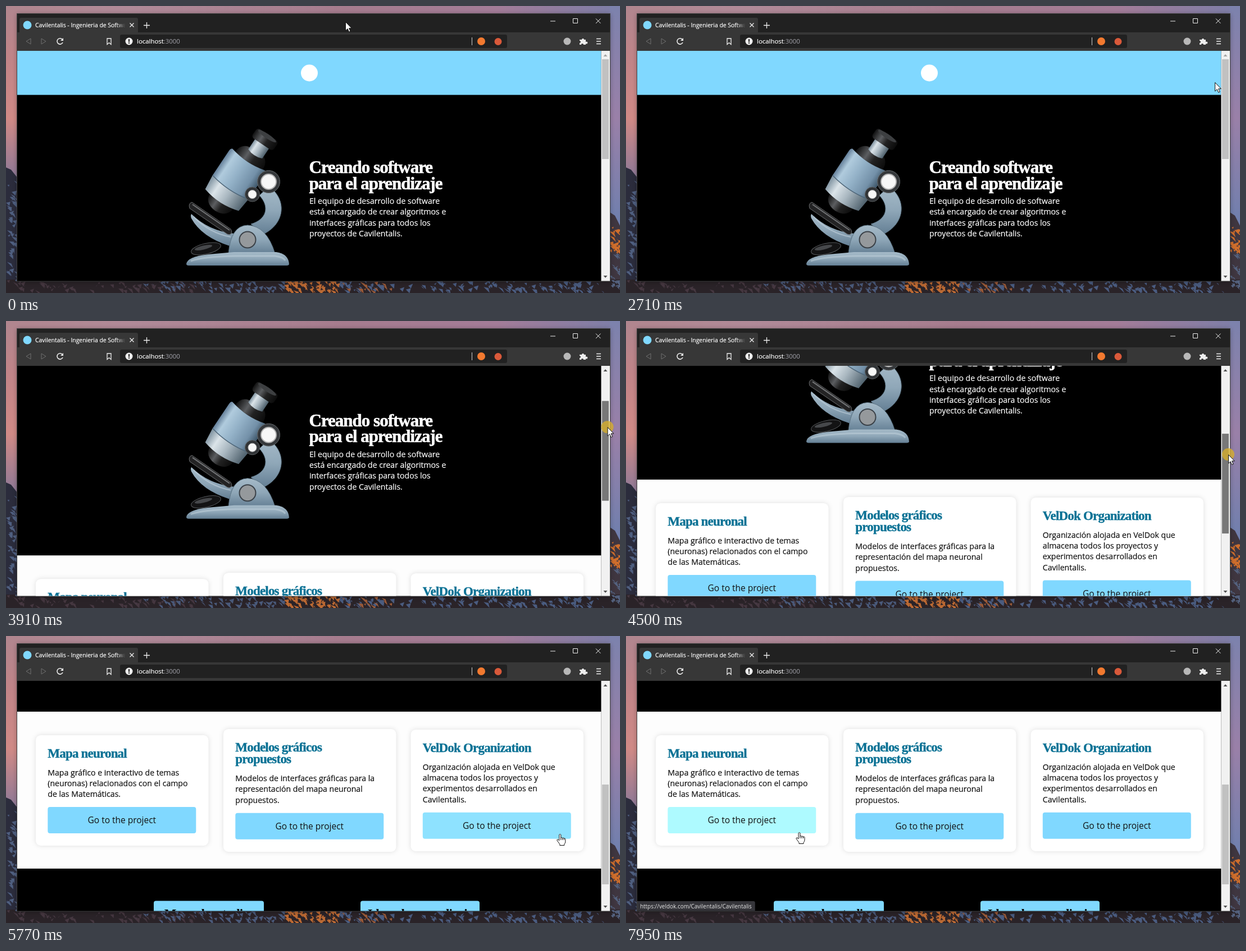
Animation of 1093x512 px, one loop 7990 ms. Source, as an HTML page:

```html
<!DOCTYPE html>
<html lang="es">
<head>
<meta charset="utf-8">
<title>Cavilentalis</title>
<style>
html, body { margin: 0; width: 100%; height: 100%; overflow: hidden; background: #212121; }
svg { display: block; width: 1093px; height: 512px; }
text { font-family: "Open Sans", "Noto Sans", sans-serif; }
.body { font-size: 14.09px; stroke-width: .2; }
.go { font-size: 15.5px; text-anchor: middle; fill: #111; }
.hero, .title { font-family: "Liberation Serif", "Noto Serif", serif; font-weight: bold; }
.hero { font-size: 31px; letter-spacing: -1px; stroke-width: .6; }
.title { font-size: 23px; letter-spacing: -.8px; stroke-width: .4; }
.ui { fill: #fff; stroke: #fff; stroke-width: .2; }
.card { filter: drop-shadow(0 0 4px rgba(0,0,0,.12)); }
.line { fill: none; stroke: #eee; stroke-width: 1.3; }
</style>
</head>
<body>
<svg viewBox="0 0 1093 512">
  <defs>
    <linearGradient id="sky" x2="1" y2="0">
      <stop stop-color="#b0868f"/><stop offset=".2" stop-color="#b08a98"/>
      <stop offset=".55" stop-color="#a67c8e"/><stop offset=".8" stop-color="#a37c98"/>
      <stop offset="1" stop-color="#7c7ea8"/>
    </linearGradient>
    <linearGradient id="west" x2="0" y2="1">
      <stop stop-color="#b0868f"/><stop offset=".3" stop-color="#c08488"/>
      <stop offset=".65" stop-color="#d08a86"/><stop offset="1" stop-color="#8b7897"/>
    </linearGradient>
    <linearGradient id="east" x2="0" y2="1">
      <stop stop-color="#7c82ad"/><stop offset=".5" stop-color="#9a80a8"/>
      <stop offset="1" stop-color="#6c7fae"/>
    </linearGradient>
    <linearGradient id="barrel" x2="1" y2="0">
      <stop stop-color="#65809a"/><stop offset=".16" stop-color="#b0cbdd"/>
      <stop offset=".45" stop-color="#94b2c8"/><stop offset=".8" stop-color="#7390a8"/>
      <stop offset="1" stop-color="#3d5568"/>
    </linearGradient>
    <linearGradient id="silver" x2="1" y2="0">
      <stop stop-color="#7b8f9d"/><stop offset=".25" stop-color="#dbe4e9"/>
      <stop offset=".55" stop-color="#a9b7c0"/><stop offset="1" stop-color="#4d5f6b"/>
    </linearGradient>
    <linearGradient id="steel" x2="0" y2="1">
      <stop stop-color="#a5bac8"/><stop offset=".5" stop-color="#8fa7b8"/>
      <stop offset="1" stop-color="#647f94"/>
    </linearGradient>
    <linearGradient id="dark" x2="1" y2="0">
      <stop stop-color="#111"/><stop offset=".35" stop-color="#5b5d60"/>
      <stop offset=".6" stop-color="#222"/><stop offset="1" stop-color="#0b0b0b"/>
    </linearGradient>
    <linearGradient id="fade" x2="1" y2="0">
      <stop stop-color="#373737" stop-opacity="0"/><stop offset="1" stop-color="#373737"/>
    </linearGradient>
    <filter id="blur"><feGaussianBlur stdDeviation="4"/></filter>
    <clipPath id="view"><rect x="20" y="80" width="1039.500" height="410.500"/></clipPath>
  </defs>

  <!-- wallpaper -->
  <rect width="1093" height="512" fill="url(#sky)"/>
  <rect width="20" height="310" fill="url(#west)"/>
  <rect x="1075" width="18" height="400" fill="url(#east)"/>
  <path d="M0 288l9 4 11 14v206H0z" fill="#2b2c3c"/>
  <path d="M1075 368l9 6 9 18v120h-18z" fill="#3f3640"/>
  <path d="M0 488h1093v24H0z" fill="#2a2328"/>
  <g id="rocks"></g>

  <!-- browser window -->
  <rect x="20" y="15" width="1055" height="477" fill="#000" opacity=".35" filter="url(#blur)"/>
  <rect x="19.500" y="13.500" width="1056" height="477.500" fill="#212121" stroke="#424242"/>
  <rect x="20" y="47" width="1055" height="33" fill="#373737"/>
  <path d="M24 47V24q0-3 3-3h205q3 0 3 3v23z" fill="#373737"/>
  <circle cx="38" cy="34" r="7.500" fill="#80d8ff"/>
  <text class="ui" x="52" y="38" font-size="10.400">Cavilentalis - Ingenieria de Softwa</text>
  <rect x="195" y="24" width="18" height="20" fill="url(#fade)"/>
  <rect x="212" y="24" width="7" height="20" fill="#373737"/>
  <path class="line" d="M220.500 30.500l7 7m0-7l-7 7M245 34.500h11m-5.500-5.500v11" stroke-width="1.600"/>
  <path class="line" d="M969 27h9M1009.500 22.500h8v8h-8zM1050 22.500l8.500 8.500m0-8.500l-8.500 8.500" style="stroke-width:1"/>
  <path class="line" d="M44 58v10l-8-5zM63 58v10l8-5z" style="stroke:#707070;stroke-width:1"/>
  <path class="line" d="M100.500 60a5.200 5.200 0 1 0 .5 5" style="stroke-width:1.600"/>
  <path d="M102 57v5h-5z" fill="#eee"/>
  <path class="line" d="M180 58h7v10.500l-3.500-3-3.500 3z"/>
  <rect x="203" y="51" width="689" height="24" rx="3" fill="#212121"/>
  <circle cx="219" cy="63" r="6.500" fill="#eee"/>
  <path d="M218 59h2v5h-2zm0 6h2v2h-2z" fill="#212121"/>
  <text class="ui" x="233" y="67" font-size="11.400">localhost<tspan fill="#a5a5ad" stroke="none">:3000</tspan></text>
  <path d="M829.500 56v14" stroke="#ccc"/>
  <circle cx="846" cy="63" r="7" fill="#f2792f"/>
  <circle cx="876" cy="63.500" r="6.500" fill="#d9593a"/>
  <circle cx="999" cy="63" r="6.500" fill="#b8b8b8"/>
  <path d="M1021 60h4a2 2 0 1 1 4 0h3v4a2 2 0 1 1 0 3v2h-4a2 2 0 0 0-4 0h-3v-3a2 2 0 0 0 0-4z" fill="#eee"/>
  <path class="line" d="M1051 58.500h8m-8 4.500h8m-8 4.500h8"/>

  <g clip-path="url(#view)">
    <g id="page">
      <rect x="20" y="80" width="1040" height="1000"/>
      <rect x="20" y="80" width="1040" height="78.600" fill="#80d8ff"/>
      <circle cx="540" cy="119.500" r="15" fill="#fff"/>

      <!-- microscope -->
      <path d="M468 322c32 22 30 66-10 85l-22-18c28-8 34-31 15-51z" fill="url(#steel)" stroke="#5d7484"/>
      <path d="M330 371q30 30 76 35l-8 22q-50-16-68-49-2-5 0-8z" fill="url(#steel)"/>
      <path d="M334 376q28 29 66 36" fill="none" stroke="#c3d3de" stroke-width="2" opacity=".6"/>
      <path d="M331 350l69 48q3 4 1 8-3 3-7 1l-67-46q-3-9 4-11z" fill="#232324" stroke="#6b6d6f"/>
      <path d="M332 354l66 46" stroke="#737577" stroke-width="2"/>
      <g transform="rotate(-13 356 433)">
        <ellipse cx="356" cy="433" rx="27" ry="9.500" fill="#131314" stroke="#55585b"/>
        <ellipse cx="352" cy="430" rx="16" ry="3.500" fill="#46484b"/>
      </g>
      <path d="M396 442q4-50 34-51 34 1 49 51z" fill="url(#steel)" stroke="#5d7484"/>
      <path d="M321 460q2-13 40-17l45-4h75q22 3 23 22-1 2-4 2H325q-4 0-4-3z" fill="url(#steel)"/>
      <path d="M329 455q20-8 80-9h70q15 2 18 8" fill="none" stroke="#c3d3de" stroke-width="3" opacity=".5"/>
      <circle cx="430" cy="417" r="14.500" fill="#95999c" stroke="#3a4148" stroke-width="2"/>
      <g transform="translate(461 238) rotate(33.800)">
        <path d="M-28 133h50q-1 21-25 22-24-1-25-22z" fill="url(#dark)"/>
        <path d="M-32 50q0-19 15-23h32q12 4 12 24z" fill="url(#dark)"/>
        <path d="M-15 7h30v24q-15 6-30 0z" fill="url(#silver)"/>
        <rect x="-23" y="-10" width="46" height="20" rx="6" fill="url(#dark)"/>
        <ellipse cx="0" cy="-7" rx="19" ry="4" fill="#3d3f41"/>
        <path d="M-39 46q36 9 69 0 5 1 5 7v52q-38 9-77 0V52q0-5 3-6z" fill="url(#barrel)"/>
        <path d="M-42 105q39 9 77 0l-3 27q-35 11-71 1z" fill="url(#silver)"/>
        <path d="M-42 105q39 9 77 0" fill="none" stroke="#4d6578" stroke-width="1.500"/>
      </g>
      <circle cx="467.500" cy="313.500" r="20" fill="#35383b" stroke="#686d70"/>
      <circle cx="467.500" cy="313.500" r="13.500" fill="#f7f7f7" stroke="#b4b4b4" stroke-width="2"/>
      <circle cx="438.500" cy="336" r="13" fill="#303336" stroke="#5c6063"/>
      <circle cx="438.500" cy="336" r="7.500" fill="#f7f7f7" stroke="#b4b4b4"/>

      <g id="hero"></g>
      <g id="cards" transform="translate(0 393.500)">
        <rect x="20" y="135" width="1040" height="280" fill="#fdfdfd"/>
      </g>
    </g>
    <g id="status">
      <path id="bubble" fill="#35353a"/>
      <text id="url" x="25" y="486" font-size="9.950" fill="#e6e6e6"></text>
    </g>
  </g>

  <rect x="1059.500" y="80" width="15.500" height="410.500" fill="#f1f1f1"/>
  <path id="up" d="M1063.500 90l3.500-4 3.500 4z"/>
  <path d="M1063.500 481l3.500 4 3.500-4z" fill="#505050"/>
  <rect id="thumb" x="1061" width="12" height="178"/>

  <g id="cursor">
    <circle id="press" r="11" fill="#d9b02c" opacity=".78"/>
    <path id="arrow" d="M.500.500v15.500l3.600-3.400 2.500 5.700 2.500-1.100-2.500-5.500h4.700z" fill="#fff" stroke="#111"/>
    <g id="hand" fill="#fff" stroke="#111" stroke-linejoin="round">
      <path d="M-2 1.500q1.600-2 3 0V7q1.500-1.200 2.800.5 1.500-1 2.700.5 2-.7 2.500 1.500v4.500q-.3 3-2 4.500v2h-8v-2l-5-7q0-2.200 2-1.500l2 2z"/>
      <path d="M1 7v4m2.800-3.500V11m2.700-3v3" fill="none"/>
    </g>
  </g>
</svg>
<script>
const LOOP = 7990, TRACK_TOP = 95, SCROLL_RATIO = 2.315, CARD_OFFSET = 393.5, FADE = 300;
const $ = id => document.getElementById(id);

function add(parent, tag, attrs, text = '') {
  const el = document.createElementNS('http://www.w3.org/2000/svg', tag);
  for (const key in attrs) el.setAttribute(key, attrs[key]);
  el.textContent = text;
  return parent.appendChild(el);
}
const addLines = (parent, cls, x, y, step, lines, fill) =>
  lines.forEach((line, i) => add(parent, 'text', { class: cls, x, y: y + i * step, fill, stroke: fill }, line));

// Scatters small rock facets over a box
let seed = 7;
const random = () => (seed = seed * 16807 % 2147483647) / 2147483647;
function scatter(x, y, width, height, count, color) {
  let d = '';
  for (let i = 0; i < count; i++) {
    const size = 3 + random() * 6, slant = (random() - .5) * 8;
    d += `M${x + random() * width} ${y + random() * height}l${size} ${slant} ${slant} ${size}z`;
  }
  add($('rocks'), 'path', { d, fill: color });
}
scatter(0, 305, 16, 185, 45, '#4f5f80');
scatter(0, 490, 340, 18, 60, '#453740');
scatter(230, 490, 260, 18, 75, '#4a5a7b');
scatter(590, 490, 470, 18, 150, '#4a5c80');
scatter(495, 488, 95, 20, 70, '#bd6a33');
scatter(590, 490, 100, 18, 15, '#9a5a38');
scatter(1073, 395, 18, 45, 35, '#cf6e2c');
scatter(1073, 440, 18, 65, 25, '#54627f');

addLines($('hero'), 'hero', 539.5, 298, 28.5, ['Creando software', 'para el aprendizaje'], '#fff');
addLines($('hero'), 'body', 540, 353, 19.35, [
  'El equipo de desarrollo de software', 'está encargado de crear algoritmos e',
  'interfaces gráficas para todos los', 'proyectos de Cavilentalis.'], '#fff');

const SITE = 'https://veldok.com/Cavilentalis';
const cards = [
  { x: 53, y: 177, h: 197, button: 305, title: ['Mapa neuronal'], url: SITE + '/Cavilentalis',
    text: ['Mapa gráfico e interactivo de temas', '(neuronas) relacionados con el campo', 'de las Matemáticas.'] },
  { x: 387, y: 166, h: 219, button: 315.7, title: ['Modelos gráficos', 'propuestos'], url: SITE + '/modelos',
    text: ['Modelos de interfaces gráficas para la', 'representación del mapa neuronal', 'propuestos.'] },
  { x: 720.5, y: 167, h: 217, button: 314.7, title: ['VelDok Organization'], url: SITE,
    text: ['Organización alojada en VelDok que', 'almacena todos los proyectos y', 'experimentos desarrollados en', 'Cavilentalis.'] },
];
for (const c of cards) {
  const g = $('cards'), x = c.x + 21.3, titleY = c.y + 40;
  add(g, 'rect', { class: 'card', x: c.x, y: c.y, width: 307.5, height: c.h, rx: 9, fill: '#fff' });
  addLines(g, 'title', x, titleY, 21.3, c.title, '#0b7295');
  addLines(g, 'body', x, titleY + 31.7 + 21.3 * (c.title.length - 1), 19.35, c.text, '#111');
  c.rect = add(g, 'rect', { x, y: c.button, width: 264, height: 47, rx: 4 });
  add(g, 'text', { class: 'go', x: x + 132, y: c.button + 29.3 }, 'Go to the project');
}
for (const [x, width, label] of [[263, 196, 'Mapa de estudios'], [631, 212, 'Ideas de aprendizaje']]) {
  add($('cards'), 'rect', { x, y: 472.5, width, height: 60, rx: 4, fill: '#80d8ff' });
  add($('cards'), 'text', { class: 'title', x: x + width / 2, y: 503, 'text-anchor': 'middle' }, label);
}

// Keys: time, x, y of the pointer
const pointerKeys = [
  [0, 604, 28], [1150, 604, 28], [1550, 850, 154], [1870, 962, 144], [2200, 962, 144],
  [2710, 1048, 136], [2960, 1061, 132], [3000, 1061, 132], [3110, 1068, 132], [3560, 1068, 132],
  [3910, 1070.5, 189], [4260, 1072, 236], [4470, 1072, 236], [4500, 1072, 238], [4930, 1076, 287],
  [5180, 1076, 302], [5550, 1076, 302], [5690, 1005, 345], [5770, 987, 353], [6050, 946, 350],
  [6210, 946, 350], [6970, 636, 342], [6990, 636, 342], [7080, 487, 334], [7260, 487, 334],
  [7580, 325, 346], [7950, 309, 350], [LOOP, 309, 350]];
// Keys: time, travel of the scrollbar thumb
const thumbKeys = [[0, 0], [3560, 0], [3910, 47.5], [4260, 104], [4470, 104], [4500, 106],
  [4930, 154.5], [5180, 170], [LOOP, 170]];

// Monotone cubic interpolation: rests stay still, no overshoot
function track(keys, t, col = 1) {
  let i = 0;
  while (i < keys.length - 2 && t >= keys[i + 1][0]) i++;
  const slope = k => keys[k] && keys[k + 1]
    ? (keys[k + 1][col] - keys[k][col]) / (keys[k + 1][0] - keys[k][0]) : 0;
  const tangent = k => {
    const a = slope(k - 1), b = slope(k);
    return a * b > 0 ? 2 * a * b / (a + b) : 0;
  };
  const [a, b] = [keys[i], keys[i + 1]], span = b[0] - a[0], u = (t - a[0]) / span, v = 1 - u;
  return a[col] * v * v * (1 + 2 * u) + b[col] * u * u * (3 - 2 * u)
    + span * u * v * (tangent(i) * v - tangent(i + 1) * u);
}

const scrollAt = t => track(thumbKeys, t) * SCROLL_RATIO;

function cardAt(t) {
  if (t < 5550) return null;
  const x = track(pointerKeys, t, 1), y = track(pointerKeys, t, 2) + scrollAt(t) - CARD_OFFSET;
  return cards.find(c => x > c.x + 21 && x < c.x + 285 && y > c.button && y < c.button + 47);
}

// Share of the last fade period spent on the card's button
function hoverAmount(card, t) {
  const samples = 30;
  let hits = 0;
  for (let i = 0; i < samples; i++) hits += cardAt(t - i * FADE / samples) === card;
  return hits / samples;
}

function statusUrl(t) {
  for (let past = t; past > 5600; past -= 20) {
    const card = cardAt(past);
    if (card) return card.url;
  }
  return '';
}

function render(t) {
  const travel = track(thumbKeys, t), dragging = t >= 3400 && t < 5550;
  $('page').setAttribute('transform', `translate(0 ${-travel * SCROLL_RATIO})`);
  $('thumb').setAttribute('y', TRACK_TOP + travel);
  $('thumb').setAttribute('fill', dragging ? '#787878' : t >= 3050 && t < 3400 ? '#a8a8a8' : '#c1c1c1');
  $('up').setAttribute('fill', travel > 0 ? '#505050' : '#a3a3a3');

  for (const card of cards) {
    const k = hoverAmount(card, t);
    card.rect.setAttribute('fill', `rgb(${128 + 46 * k},${216 + 34 * k},255)`);
  }

  const showStatus = t >= 6210;
  $('status').style.display = showStatus ? '' : 'none';
  if (showStatus) {
    $('url').textContent = statusUrl(t);
    const right = 31 + $('url').getComputedTextLength();
    $('bubble').setAttribute('d', `M20 473H${right - 3}q3 0 3 3V491H20z`);
  }

  const hand = !!cardAt(t);
  $('cursor').setAttribute('transform', `translate(${track(pointerKeys, t, 1)} ${track(pointerKeys, t, 2)})`);
  $('press').style.display = dragging ? '' : 'none';
  $('arrow').style.display = hand ? 'none' : '';
  $('hand').style.display = hand ? '' : 'none';
}

const start = performance.now();
function tick() {
  render((performance.now() - start) % LOOP);
  requestAnimationFrame(tick);
}
tick();
</script>
</body>
</html>
```
